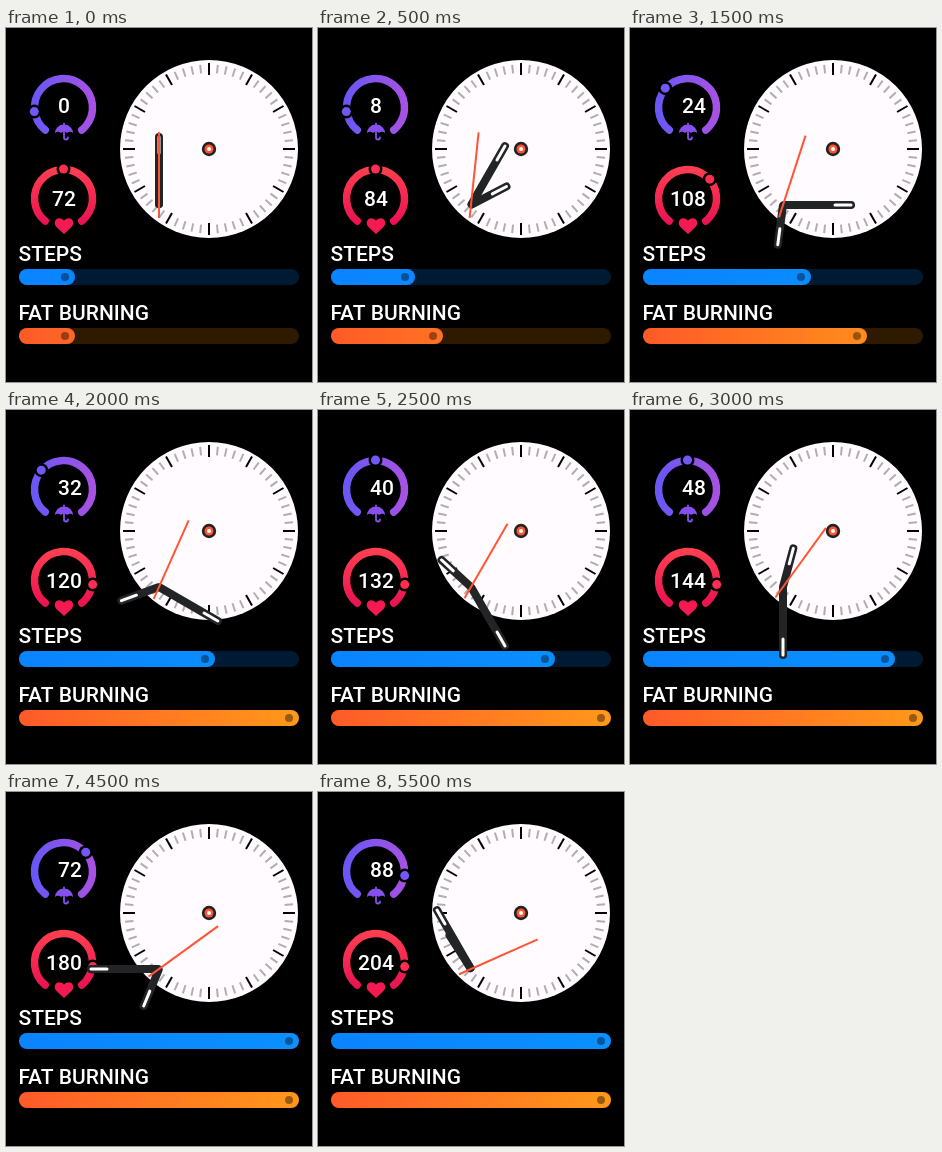
Write an HTML page with a canvas that moves like this. It is 306 by 354 pixels and loops after 6000 ms.

```html
<!DOCTYPE html>
<html lang="en">
<head>
<meta charset="utf-8">
<title>Watch face</title>
<style>
  html, body { margin: 0; width: 100%; height: 100%; overflow: hidden; background: #000; }
  canvas { display: block; }
</style>
</head>
<body>
<canvas id="face" width="306" height="354"></canvas>
<script>
const ctx = document.getElementById('face').getContext('2d');
const STEP = 500, STEPS = 12;
const DIAL = [203, 121], PIVOT = [153, 177];
const rad = deg => deg * Math.PI / 180;

function gradient(x0, y0, x1, y1, from, to) {
  const g = ctx.createLinearGradient(x0, y0, x1, y1);
  g.addColorStop(0, from);
  g.addColorStop(1, to);
  return g;
}
const violet = gradient(25, 80, 90, 80, '#6757f6', '#a952e2');
const red = gradient(0, 140, 0, 200, '#ff3f50', '#e80f52');
const blue = gradient(13, 0, 293, 0, '#0a84ff', '#0a90ff');
const orange = gradient(13, 0, 293, 0, '#ff5a28', '#ff981a');

function disc(x, y, r, color) {
  ctx.fillStyle = color;
  ctx.beginPath();
  ctx.arc(x, y, r, 0, 7);
  ctx.fill();
}

// Radial stroke at a clockwise angle from twelve o'clock.
function spoke([x, y], deg, r0, r1, width, color, cap = 'butt') {
  const s = Math.sin(rad(deg)), c = Math.cos(rad(deg));
  ctx.strokeStyle = color;
  ctx.lineWidth = width;
  ctx.lineCap = cap;
  ctx.beginPath();
  ctx.moveTo(x + r0 * s, y - r0 * c);
  ctx.lineTo(x + r1 * s, y - r1 * c);
  ctx.stroke();
}

function text(str, x, y, align = 'left') {
  ctx.font = '500 21px Roboto, sans-serif';
  ctx.textAlign = align;
  ctx.fillStyle = '#fff';
  ctx.fillText(str, x, y);
}

function dial() {
  disc(...DIAL, 89, '#fffbff');
  for (let i = 0; i < 60; i++) {
    if (i % 5) spoke(DIAL, i * 6, 76, 84.5, 2, '#b0aeb0');
    else spoke(DIAL, i * 6, 74, 86, 2, '#000');
  }
}

function hand(deg, length) {
  spoke(PIVOT, deg, 1, length - 4, 8, '#222425', 'round');
  spoke(PIVOT, deg, length - 20, length - 4, 3, '#fff', 'round');
}

function gauge(y, color, knob, level) {
  const x = 57.5, a = rad(-90 + level * 49 - 98);
  ctx.strokeStyle = color;
  ctx.lineWidth = 7.5;
  ctx.lineCap = 'round';
  ctx.beginPath();
  ctx.arc(x, y, 29, rad(-231), rad(51));
  ctx.stroke();
  const kx = x + 29.5 * Math.cos(a), ky = y + 29.5 * Math.sin(a);
  disc(kx, ky, 7, '#000');
  disc(kx, ky, 4.5, knob);
}

function umbrella() {
  ctx.fillStyle = ctx.strokeStyle = '#8550ec';
  ctx.fill(new Path2D('M49 105a9 8.5 0 0 1 18 0q-3-2.5-6 0q-3-2.5-6 0q-3-2.5-6 0z'));
  ctx.lineWidth = 1.8;
  ctx.stroke(new Path2D('M58 95.5V98M58 103v6.5a2 2 0 0 0 4 0'));
}

function heart() {
  ctx.fillStyle = '#f31a52';
  ctx.fill(new Path2D('M58 206L50.5 199C45.5 194 52 186.500 58 192.500C64 186.500 70.500 194 65.500 199Z'));
}

function bar(label, y, track, color, level) {
  const width = 28 * level;
  text(label, 12.5, y - 8);
  for (const [w, fill] of [[280, track], [width, color]]) {
    ctx.fillStyle = fill;
    ctx.beginPath();
    ctx.roundRect(13, y, w, 16, 8);
    ctx.fill();
  }
  disc(3 + width, y + 8, 4, 'rgba(0,0,0,.4)');
}

function draw(k) {
  const rain = 8 * k, pulse = 72 + 12 * k;
  ctx.fillStyle = '#000';
  ctx.fillRect(0, 0, 306, 354);
  dial();

  gauge(79.5, violet, '#7457f8', Math.floor(rain / 20));
  umbrella();
  text(rain, 52, 85);

  gauge(170.5, red, '#ff2d50', Math.min(4, Math.floor(pulse / 30)));
  heart();
  text(pulse, 58, 178, 'center');

  bar('STEPS', 241, '#001a33', blue, Math.min(10, Math.round(2 + 1.2 * k)));
  bar('FAT BURNING', 300, '#2f1a00', orange, Math.min(10, 2 + 2 * k));

  hand(62.5 * k, 44);
  hand(30 * k, 72);
  spoke(PIVOT, 6 * k, -13, 73, 2, '#ff5535');
  disc(...DIAL, 7.2, '#222');
  disc(...DIAL, 4.5, '#ff5535');
  disc(...DIAL, 2, '#fff');
}

const start = performance.now();
function tick() {
  draw(Math.floor((performance.now() - start) / STEP) % STEPS);
  requestAnimationFrame(tick);
}
tick();
</script>
</body>
</html>
```
